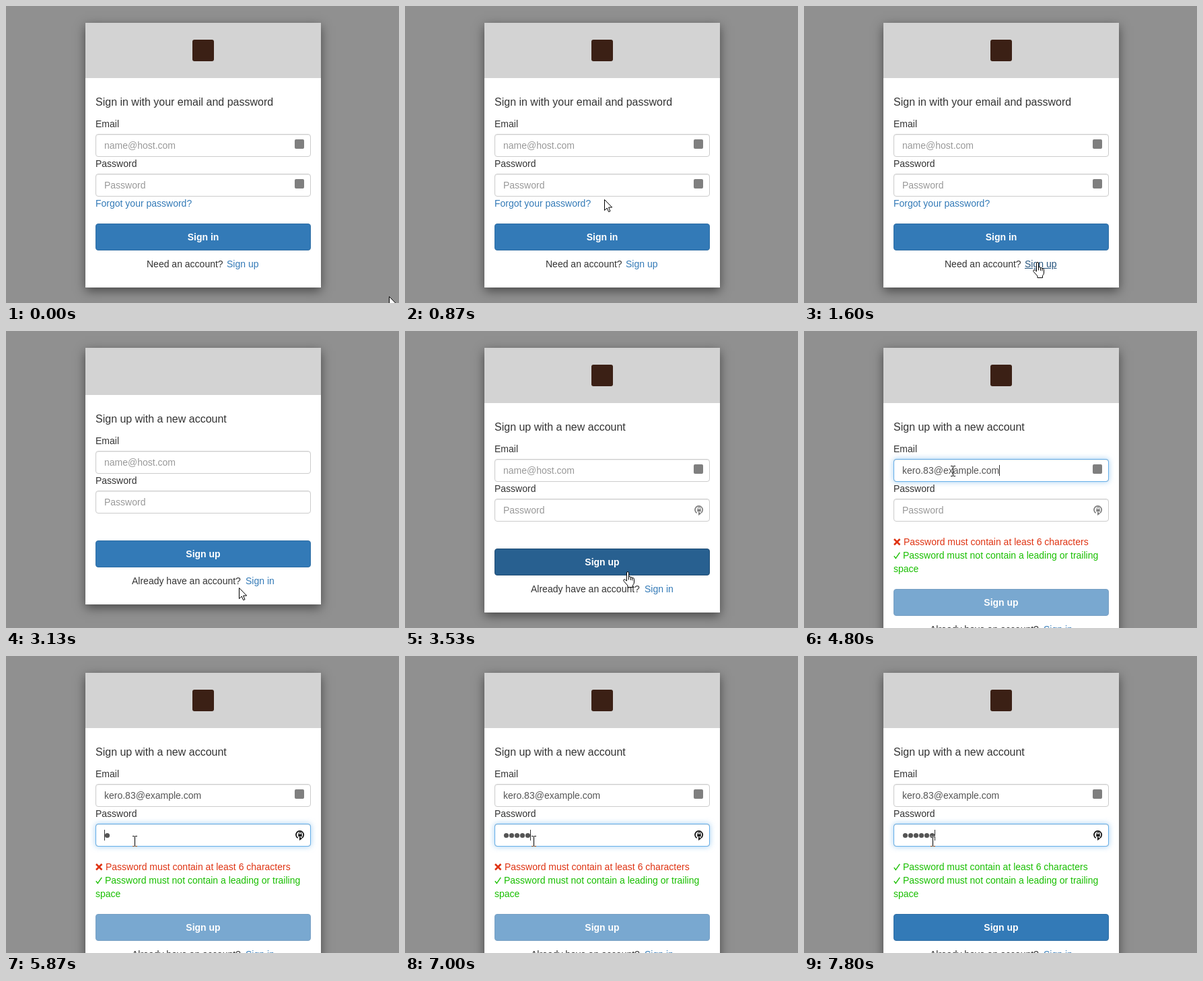
Animation of 584 by 441 pixels, one loop 8000 ms. Source, as an HTML page:

```html
<!DOCTYPE html>
<html lang="en">
<head>
<meta charset="utf-8">
<title>Sign in and sign up</title>
<style>
  html, body { margin: 0; width: 100%; height: 100%; overflow: hidden; }
  #stage {
    position: relative; width: 584px; height: 441px; overflow: hidden; isolation: isolate;
    background: #909090; color: #333;
    font: 14px/20px "Liberation Sans", Arial, sans-serif; white-space: nowrap;
  }
  #stage * { box-sizing: border-box; }
  #stage [hidden] { display: none; }
  #card { position: absolute; left: 118px; top: 25px; width: 350px; background: #fff; box-shadow: 0 5px 15px rgba(0,0,0,.5); }
  #head { height: 82px; background: #d3d3d3; }
  #logo { position: absolute; left: 159px; top: 25px; width: 32px; height: 32px; border-radius: 3px; background: #3b2015; }
  #form { position: absolute; left: 15px; top: 82px; width: 320px; }
  #form > *, #lower > *, .field > * { position: absolute; }
  #title { top: 26px; font-size: 16px; }
  .field {
    width: 320px; height: 34px; padding: 6px 12px; border: 1px solid #ccc; border-radius: 4px;
    color: #555; box-shadow: inset 0 1px 1px rgba(0,0,0,.075);
  }
  .glow { inset: -1px; border: 1px solid #66afe9; border-radius: 4px; box-shadow: 0 0 8px rgba(102,175,233,.6); }
  .hint { color: #999; }
  .caret { display: inline-block; width: 1px; height: 16px; margin-right: -1px; background: #333; vertical-align: -3px; }
  .badge { left: 295px; top: 7px; width: 14px; height: 14px; border-radius: 2px; background: #7f7f7f; }
  #renew { left: 295px; top: 7px; }
  #passCaret { top: 8px; }
  #dots { left: 12px; top: 6px; fill: #555; }
  .link { color: #337ab7; }
  .link.over { color: #23527c; text-decoration: underline; }
  .ok { color: #19bf00; }
  .bad { color: #df3312; }
  #rules { top: 196px; }
  .rule { position: relative; height: 20px; }
  .rule svg { position: absolute; left: 0; top: 5px; fill: none; stroke: currentColor; }
  .rule span { position: absolute; left: 14px; }
  .rule.bad span { left: 15px; }
  #button {
    top: 216px; width: 320px; height: 40px; border: 1px solid #2e6da4; border-radius: 4px;
    background: #337ab7; color: #fff; font-weight: bold; line-height: 38px; text-align: center;
  }
  #button.over { background: #286090; border-color: #204d74; }
  .cursor { position: absolute; left: 0; top: 0; overflow: visible; }
  .cursor path { fill: #fff; stroke: #000; }
  #beam { mix-blend-mode: difference; }
  #beam path { fill: none; stroke: #fff; }
</style>
</head>
<body>
<div id="stage">
  <div id="card">
    <div id="head"></div>
    <div id="logo"></div>
    <div id="form">
      <div id="title"></div>
      <div style="top:58px">Email</div>
      <div class="field" style="top:83px">
        <div class="glow" id="mailGlow"></div>
        <span class="hint" id="mailHint">name@host.com</span>
        <span><span id="mail">kero.83@example.com</span><i class="caret" id="mailCaret"></i></span>
        <div class="badge" id="mailBadge"></div>
      </div>
      <div style="top:117px">Password</div>
      <div class="field" style="top:142px">
        <div class="glow" id="passGlow"></div>
        <span class="hint" id="passHint">Password</span>
        <svg id="dots" width="60" height="20"></svg>
        <i class="caret" id="passCaret"></i>
        <div class="badge" id="passBadge"></div>
        <svg id="renew" width="16" height="18" fill="none">
          <path d="M4.6 13.2A5.6 5.6 0 1 1 10.8 13.1" stroke="currentColor" stroke-width="1.7"/>
          <path d="M7 11.2V17L11.2 14.1Z" fill="currentColor"/>
          <path d="M6.3 8V6.3a1.7 1.7 0 0 1 3.4 0V8" stroke="currentColor"/>
          <path d="M5.3 7.5h5.4v3.7H5.3Z" fill="currentColor"/>
        </svg>
      </div>
      <div class="link" id="forgot" style="top:176px">Forgot your password?</div>
      <div id="rules">
        <div class="rule" id="length">
          <svg width="11" height="11"><path id="mark"/></svg>
          <span>Password must contain at least 6 characters</span>
        </div>
        <div class="rule ok">
          <svg width="11" height="11"><path d="M.8 6.2L3.3 9.6L9.3 .8" stroke-width="1.4"/></svg>
          <span>Password must not contain a leading or trailing</span>
        </div>
        <div class="ok">space</div>
      </div>
      <div id="lower">
        <div id="button"></div>
        <div id="note" style="top:266px"></div>
        <div class="link" id="swap" style="top:266px"></div>
      </div>
    </div>
  </div>
  <svg class="cursor" id="arrow" width="1" height="1"><path d="M.5 .5V16.5L4.2 13L6.7 18.6L9 17.6L6.6 12H11.7Z"/></svg>
  <svg class="cursor" id="hand" width="1" height="1">
    <g transform="translate(-6 -1)">
      <path d="M5.5 14V2Q5.5 .5 7 .5T8.5 2V8.2Q9 7.4 10 7.5T11.5 9Q12 8.4 12.8 8.5T14 10Q15 9.3 15.8 9.9T16.5 11.5V16Q16.5 18.5 14.5 20.5V23.5H7V21L1.2 14.5Q.3 13 1.2 12.2T3.3 12.4Z"/>
      <path d="M8.5 8V12.5M11.5 9V13M14 10V13.5"/>
    </g>
  </svg>
  <svg class="cursor" id="beam" width="1" height="1"><path d="M-3 -7.5H0M1 -7.5H4M.5 -7V7M-3 7.5H0M1 7.5H4"/></svg>
</div>
<script>
  const LOOP = 8000, TICK = 1000 / 15;
  const ui = {};
  document.querySelectorAll('[id]').forEach(el => ui[el.id] = el);

  // Pointer legs: start, end, from, to
  const legs = [
    [0, 330, 569, 431, 281, 206],
    [470, 1270, 281, 206, 310, 367],
    [1330, 1600, 310, 367, 346, 381],
    [3400, 4000, 346, 381, 222, 207],
    [4800, 5400, 221, 208, 191, 275]
  ];
  const presses = [5870, 6330, 6600, 6730, 6930, 7670];
  const caretSteps = [6000, 6400, 6600, 6730, 7000, 7670];

  const clamp = v => Math.min(1, Math.max(0, v));
  const ease = v => v * v * (3 - 2 * v);
  const within = (v, a, b) => v >= a && v < b;
  const passed = (times, t) => times.filter(x => t >= x).length;
  const show = (el, on) => el.toggleAttribute('hidden', !on);
  const text = (el, s) => { if (el.textContent !== s) el.textContent = s; };

  presses.forEach((_, i) => {
    const dot = document.createElementNS('http://www.w3.org/2000/svg', 'circle');
    dot.setAttribute('cx', 4.5 + 8 * i);
    dot.setAttribute('cy', 10.5);
    dot.setAttribute('r', 3.6);
    ui.dots.append(dot);
  });

  function pointer(t) {
    const now = Math.floor((t + 3.4) / TICK) * TICK + 3.4;
    const [a, b, x0, y0, x1, y1] = legs.filter(l => now >= l[0]).pop();
    const k = ease(clamp((now - a) / (b - a)));
    return [Math.round(x0 + (x1 - x0) * k), Math.round(y0 + (y1 - y0) * k)];
  }

  function drawPointer(t, joining) {
    const [x, y] = pointer(t);
    const inside = within(x, 133, 453);
    const onButton = inside && within(y, 323, 363);
    const onLink = !joining && within(x, 328, 377) && within(y, 373, 393);
    const onField = inside && (within(y, 190, 224) || within(y, 249, 283));
    const kind = onField ? 'beam' : onButton || onLink ? 'hand' : 'arrow';
    for (const name of ['arrow', 'hand', 'beam']) {
      show(ui[name], name === kind);
      ui[name].style.transform = `translate(${x}px, ${y}px)`;
    }
    ui.button.classList.toggle('over', onButton);
    ui.swap.classList.toggle('over', onLink);
  }

  function drawCard(t, joining) {
    const logo = !within(t, 3130, 3200);
    const rules = t >= 4800;
    const valid = t >= 7800;
    const shift = logo ? 0 : -12;
    const drop = rules ? 60 : 0;

    ui.card.style.height = 393 + shift + drop + 'px';
    ui.head.style.height = 82 + shift + 'px';
    ui.form.style.top = 82 + shift + 'px';
    ui.lower.style.top = drop + 'px';
    show(ui.logo, logo);
    show(ui.forgot, !joining);
    show(ui.rules, rules);

    text(ui.title, joining ? 'Sign up with a new account' : 'Sign in with your email and password');
    text(ui.button, joining ? 'Sign up' : 'Sign in');
    text(ui.note, joining ? 'Already have an account?' : 'Need an account?');
    text(ui.swap, joining ? 'Sign in' : 'Sign up');
    ui.note.style.left = joining ? '54px' : '76px';
    ui.swap.style.left = joining ? '223px' : '195px';
    ui.button.style.opacity = rules && !valid ? .65 : 1;

    ui.length.className = valid ? 'rule ok' : 'rule bad';
    ui.mark.setAttribute('d', valid ? 'M.8 6.2L3.3 9.6L9.3 .8' : 'M1 1L9.5 9.5M9.5 1L1 9.5');
    ui.mark.setAttribute('stroke-width', valid ? 1.4 : 2.6);
  }

  function drawFields(t, joining) {
    const mailed = t >= 4730;
    const typed = passed(presses, t);
    const toPass = clamp((t - 5330) / 150);

    show(ui.mail, mailed);
    show(ui.mailHint, !mailed);
    show(ui.mailCaret, within(t, 4070, 4530) || within(t, 4730, 5330));
    ui.mailGlow.style.opacity = clamp((t - 4070) / 150) * (1 - toPass);
    ui.passGlow.style.opacity = toPass;

    show(ui.passHint, !typed);
    [...ui.dots.children].forEach((dot, i) => show(dot, i < typed));
    show(ui.passCaret, within(t, 5330, 7470) || t >= 7670);
    ui.passCaret.style.left = 12 + 8 * passed(caretSteps, t) + 'px';

    show(ui.mailBadge, !within(t, 3130, 3330));
    show(ui.passBadge, !joining);
    show(ui.renew, t >= 3330);
    ui.renew.style.color = t >= 5330 ? '#111' : '#808080';
  }

  function draw(t) {
    const joining = t >= 3130;
    drawCard(t, joining);
    drawFields(t, joining);
    drawPointer(t, joining);
  }

  const start = performance.now();
  function frame(now) {
    draw(Math.max(0, now - start) % LOOP);
    requestAnimationFrame(frame);
  }
  draw(0);
  requestAnimationFrame(frame);
</script>
</body>
</html>
```
